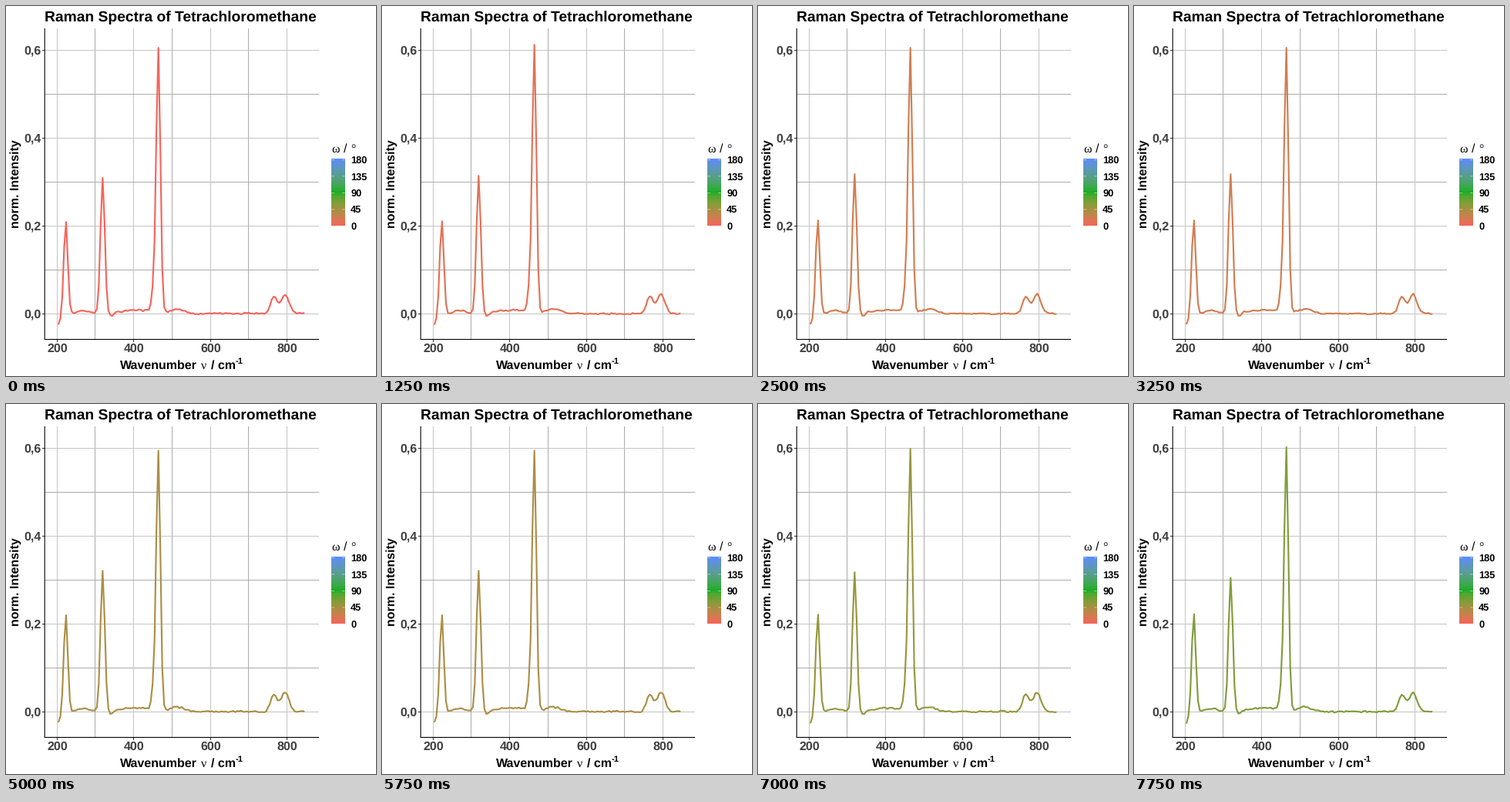
Animation, 480 px wide and 480 px high, one loop 8000 ms. Source, as a matplotlib script:

```python
import numpy as np
import matplotlib.pyplot as plt
from matplotlib.animation import FuncAnimation

SIZE, DPI = 480, 80
FRAMES, INTERVAL = 32, 250
SANS, SERIF = "Liberation Sans", "Liberation Serif"
TICK_TEXT = "#3f3f3f"
plt.rcParams["text.hinting"] = "none"

# Data to pixel scales
X0, X_STEP = 66.2, 0.4975
Y0, Y_STEP = 399.4, 569.7
SAMPLES = np.arange(129)

# Start and end of each change to the next angle, in frames
CHANGES = [(4, 5), (8, 10), (14, 15), (19, 20), (25, 26), (30, 31)]

# Gradient ends in Lab, interpolated at 0, 90 and 180 degrees
STOPS = np.array([[248, 118, 109], [0, 186, 56], [97, 156, 255]]) / 255
TO_XYZ = np.array([[.4124, .3576, .1805],
                   [.2126, .7152, .0722],
                   [.0193, .1192, .9505]])
WHITE = TO_XYZ.sum(axis=1)


def to_lab(rgb):
    linear = np.where(rgb > .04045, ((rgb + .055) / 1.055) ** 2.4, rgb / 12.92)
    x, y, z = np.cbrt(TO_XYZ @ linear / WHITE)
    return np.array([116 * y - 16, 500 * (x - y), 200 * (y - z)])


def to_rgb(lab):
    y = (lab[0] + 16) / 116
    xyz = np.array([y + lab[1] / 500, y, y - lab[2] / 200]) ** 3 * WHITE
    linear = np.clip(np.linalg.solve(TO_XYZ, xyz), 0, 1)
    return np.where(linear > .0031308,
                    1.055 * linear ** (1 / 2.4) - .055, 12.92 * linear)


LAB_STOPS = np.array([to_lab(c) for c in STOPS])


def angle_colour(angle):
    lab = [np.interp(angle, [0, 90, 180], channel) for channel in LAB_STOPS.T]
    # Display profile: steeper gamma, some green bleeding into red
    r, g, b = to_rgb(np.array(lab)) ** (2.2 / 1.8)
    return r + .12 * g * (1 - r), g, b


def spectrum(state):
    """Sum of Gaussian bands (centre, width, height) plus seeded noise."""
    second = np.interp(state, [0, 3, 5, 6], [308, 321, 317, 303])
    main = np.interp(state, [0, 1, 4, 6], [599, 606, 588, 596])
    bands = [
        (0, 1, -24 - state / 2),
        (3.84, 1.02, 212 + 2.3 * state),
        (13, 3, 7),
        (23, 1.11, second),
        (27.5, 1, -9),
        (41, 9, 8),
        (49.6, 1, 55),
        (51.97, 1.07, main),
        (62, 3.5, 10),
        (112.1, 1.7, 39),
        (117.9, 2, 44),
    ]
    values = np.random.default_rng(40 + state).normal(.6, 1, len(SAMPLES))
    for centre, width, height in bands:
        values += height * np.exp(-((SAMPLES - centre) / width) ** 2 / 2)
    return values / 1000


SPECTRA = [spectrum(s) for s in range(len(CHANGES) + 1)]


def px(size):
    return size * 72 / DPI


fig = plt.figure(figsize=(SIZE / DPI, SIZE / DPI), dpi=DPI, facecolor="white")
ax = fig.add_axes([0, 0, 1, 1])
ax.axis("off")


def text(x, y, s, size=16, weight="bold", colour="black", font=SANS, **kw):
    ax.text(x, y, s, fontsize=px(size), weight=weight, color=colour,
            family=font, **kw)


def segment(xs, ys, colour, width=1.0, z=1):
    ax.plot(xs, ys, color=colour, lw=px(width), zorder=z,
            solid_capstyle="butt", snap=False)


def pixel_centre(v):
    return np.floor(v) + .5


# Grid, axis ticks and tick labels
for i in range(7):
    x = pixel_centre(X0 + i * 100 * X_STEP)
    y = pixel_centre(Y0 - i * .1 * Y_STEP)
    major = i % 2 == 0
    grid = "#c4c4c4" if major else "#ababab"
    segment([50, 406], [y, y], grid)
    segment([x, x], [29, 432], grid)
    if major:
        segment([47, 50], [y, y], "#333333")
        segment([x, x], [433, 436], "#333333")
        text(45.3, y + 5.2, f"0,{i}", colour=TICK_TEXT, ha="right")
        text(x + .4, 448.8, f"{200 + 100 * i}", colour=TICK_TEXT, ha="center")

segment([50.2, 50.2], [29, 433], "black", 1.1, 4)
segment([50, 406], [432.5, 432.5], "black", 1.1, 4)

# Titles
text(50, 20, "Raman Spectra of Tetrachloromethane", 19.3)
text(16.5, 230.5, "norm. Intensity", rotation=90, ha="center",
     va="baseline", rotation_mode="anchor")
text(148, 470.7, "Wavenumber")
text(253, 470.7, "ν", weight="normal", font=SERIF)
text(265.5, 470.7, "/ cm")
text(297.5, 464.3, "-1", 11.2)

# Colour legend
TOP, BOTTOM, LEFT, RIGHT = 199.4, 285.5, 422.3, 439.6
text(422, 190, "ω", weight="normal", font=SERIF)
text(437.5, 190, "/", weight="normal")
text(447.5, 190, "°", weight="normal", font=SERIF)
bar = np.array([[angle_colour(a)] for a in np.linspace(180, 0, 200)])
ax.imshow(bar, extent=(LEFT, RIGHT, BOTTOM, TOP), aspect="auto", zorder=2)
for angle in range(0, 181, 45):
    y = BOTTOM - (BOTTOM - TOP) * angle / 180
    for x in (LEFT, RIGHT - 3.5):
        segment([x, x + 3.5], [y, y], "white", .5, 3)
    text(447.1, y + 4.6, str(angle), 12.8)

curve_x = 68 + 2.494 * SAMPLES
curve, = ax.plot(curve_x, curve_x, lw=px(2.13), zorder=3,
                 solid_joinstyle="round", solid_capstyle="butt")
ax.set(xlim=(0, SIZE), ylim=(SIZE, 0))


def draw(frame):
    pos = sum(np.clip((frame - a) / (b - a), 0, 1) for a, b in CHANGES)
    low, high = int(pos), int(np.ceil(pos))
    values = SPECTRA[low] + (pos - low) * (SPECTRA[high] - SPECTRA[low])
    curve.set_ydata(Y0 - Y_STEP * values)
    curve.set_color(angle_colour(10 * pos))
    return curve,


anim = FuncAnimation(fig, draw, frames=FRAMES, interval=INTERVAL,
                     repeat=True, repeat_delay=0)
plt.show()
```
